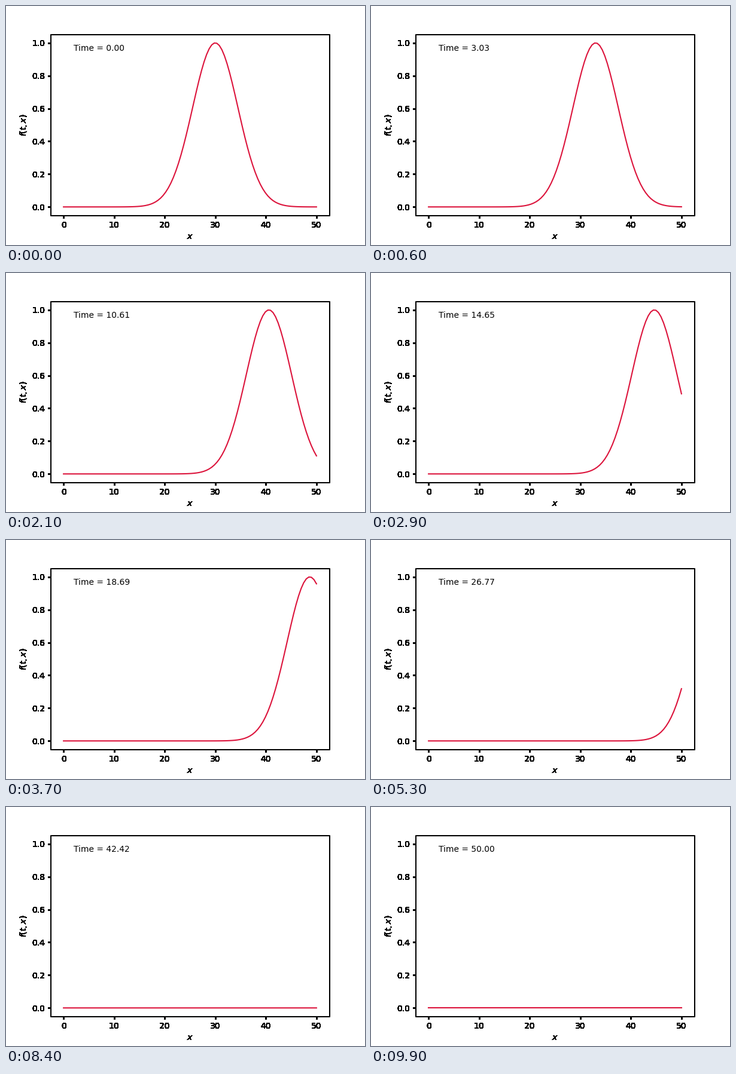
These frames come from a looping animation (600x400 px, 10000 ms). A matplotlib script:

```python
import numpy as np
import matplotlib.pyplot as plt
from matplotlib.animation import FuncAnimation

FRAMES = 100
LAYERS = 100
X = np.linspace(0, 50, 100)
TIMES = np.linspace(0, 50, FRAMES)


def pulse(t):
    """Gaussian advected to the right at unit speed."""
    return np.exp(-(X - 30 - t) ** 2 / 40)


fig = plt.figure(figsize=(6, 4), dpi=100, facecolor="white")
ax = fig.add_axes([0.125, 0.125, 0.775, 0.755])
ax.set(xlim=(-2.5, 52.5), ylim=(-0.05, 1.05), xlabel="$x$", ylabel="$f(t,x)$")

# Stack identical axes layers: antialiased edges build up to solid black.
fig.canvas.draw()
renderer = fig.canvas.get_renderer()
for _ in range(LAYERS - 1):
    ax.draw(renderer)
backdrop = np.array(fig.canvas.buffer_rgba())

ax.set_axis_off()
fig.figimage(backdrop, origin="upper", zorder=-1)

line, = ax.plot(X, pulse(0), color="crimson", lw=1.5)
label = ax.text(2, 0.95, "", fontsize=10)


def update(i):
    line.set_ydata(pulse(TIMES[i]))
    label.set_text(f"Time = {TIMES[i]:.2f}")
    return line, label


anim = FuncAnimation(fig, update, frames=FRAMES, interval=100,
                     repeat=True, repeat_delay=0)
plt.show()
```
